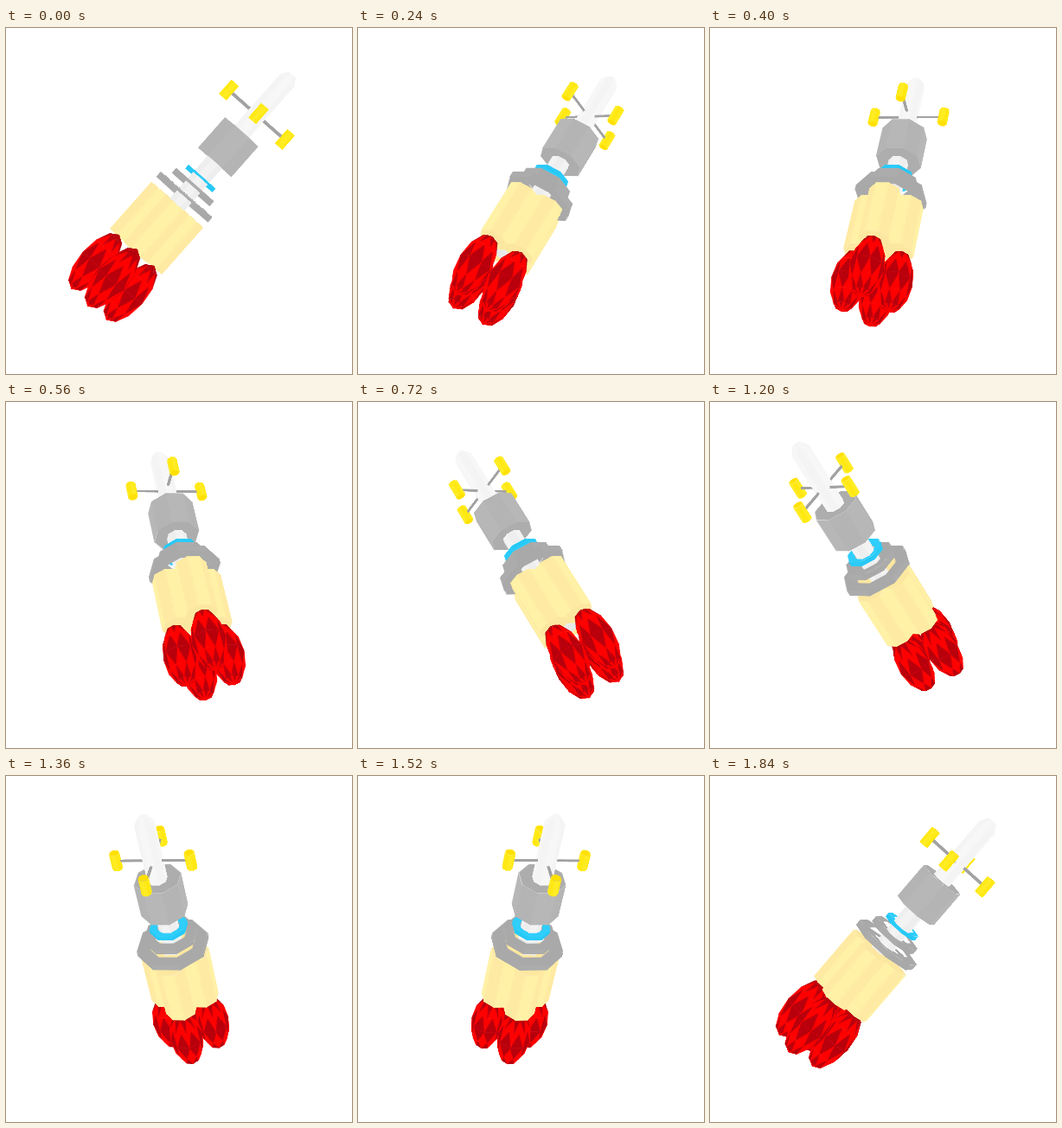
Write an HTML page without scripts that moves like this. It is 400 by 400 pixels and loops after 1920 ms.

```html
<!DOCTYPE html>
<html lang="en">
<head>
<meta charset="utf-8">
<title>Spinning rocket</title>
<style>
@property --a { syntax: "<angle>"; inherits: true; initial-value: 0deg; }
@keyframes turn { to { --a: 360deg; } }

html, body { margin: 0; width: 100%; height: 100%; overflow: hidden; background: #fff; }
.stage { position: absolute; inset: 0; overflow: hidden; isolation: isolate; animation: turn 1920ms steps(24) infinite; }

/* Parts stack along the rocket's axis: k grows towards the flames */
.set, .p { position: absolute; left: 0; top: 0; z-index: calc(200 * var(--k) * sin(var(--a))); }
.p {
  --o: 0deg; --d: 0px;
  width: 0; height: 0;
  transform-style: preserve-3d;
  transform-origin: 0 0;
  transform: translate(201px, 165px) perspective(2000px) translateY(35.6px)
    rotateY(var(--a)) translateZ(7px) rotateZ(41.5deg)
    rotateY(var(--o)) translate3d(0, var(--y), var(--d));
}

/* Four copies around the axis, sorted by depth */
.set .p { z-index: calc(100 * (cos(var(--a)) * cos(var(--o)) - .75 * sin(var(--a)) * sin(var(--o)))); }
.set .p:nth-child(2) { --o: 90deg; }
.set .p:nth-child(3) { --o: 180deg; }
.set .p:nth-child(4) { --o: 270deg; }
.set .core { z-index: 0; }

/* Side face: r and q are the top and bottom radius, t the start, h the height */
i {
  --q: var(--r); --t: 0px;
  --w: calc(var(--r) * .8284 + 1.2px);
  --v: calc(var(--q) * .8284 + 1.2px);
  --m: max(var(--w), var(--v));
  position: absolute; left: 0; top: 0;
  width: var(--m);
  height: calc(hypot(var(--q) - var(--r), var(--h)) + .8px);
  background: var(--c);
  backface-visibility: hidden;
  transform-origin: 0 0;
  transform: rotateY(calc(var(--i) * 45deg)) translate3d(-50%, var(--t), var(--r))
    rotateX(atan2(var(--q) - var(--r), var(--h)));
}
i:nth-child(2n) { background: var(--e); }
i:nth-child(8n+1) { --i: 0; }
i:nth-child(8n+2) { --i: 1; }
i:nth-child(8n+3) { --i: 2; }
i:nth-child(8n+4) { --i: 3; }
i:nth-child(8n+5) { --i: 4; }
i:nth-child(8n+6) { --i: 5; }
i:nth-child(8n+7) { --i: 6; }
i:nth-child(8n) { --i: 7; }
.flame i, .tip i:nth-child(-n+8) {
  --x: calc((var(--m) - var(--w)) / 2);
  --z: calc((var(--m) - var(--v)) / 2);
  clip-path: polygon(var(--x) 0, calc(100% - var(--x)) 0, calc(100% - var(--z)) 100%, var(--z) 100%);
}

/* End caps */
b {
  position: absolute; left: 0; top: 0;
  width: calc(var(--r) * 2); height: calc(var(--r) * 2);
  background: var(--l);
  backface-visibility: hidden;
  transform-origin: 0 0;
  transform: rotateX(90deg) translate(-50%, -50%);
  clip-path: polygon(29.3% 0, 70.7% 0, 100% 29.3%, 100% 70.7%, 70.7% 100%, 29.3% 100%, 0 70.7%, 0 29.3%);
}
b + b, .rod b { transform: translateY(var(--h)) rotateX(-90deg) translate(-50%, -50%); }

.rod { --r: 10.8px; --c: #f3f3f3; --e: #eeeeee; --l: #e8e8e8; }
.tip { --y: -195px; --r: 10.6px; --h: 79px; --c: #f7f7f7; --e: #f4f4f4; --l: #f6f6f6; }
.tip i { --t: 9px; }
.tip i:nth-child(-n+8) { --r: 5px; --q: 10.6px; --h: 9px; --t: 0px; }
.tip b { --r: 5px; }

.set .arm { --y: -144.5px; --d: 43px; --r: 5.3px; --h: 21px; --c: #ffec24; --e: #ffe812; --l: #ffe100; }
/* Strut from the pod back to the hull */
em {
  position: absolute; left: 0; top: 8.5px;
  width: 33px; height: 4px;
  background: #a2a2a2;
  transform-origin: 0 50%;
  transform: rotateY(90deg);
}
em + em { transform: rotateY(90deg) rotateX(90deg); }

.body { --y: -107px; --r: 25.2px; --h: 46px; --c: #b7b7b7; --e: #b4b4b4; --l: #adadad; }

.ring { --h: 7px; --c: #acacac; --e: #a9a9a9; --l: #a9a9a9; }
.ring b {
  backface-visibility: visible;
  clip-path: polygon(evenodd,
    29.3% 0, 70.7% 0, 100% 29.3%, 100% 70.7%, 70.7% 100%, 29.3% 100%, 0 70.7%, 0 29.3%, 29.3% 0,
    36.3% 17%, 63.7% 17%, 83% 36.3%, 83% 63.7%, 63.7% 83%, 36.3% 83%, 17% 63.7%, 17% 36.3%, 36.3% 17%);
}
.blue { --h: 5px; --c: #2bcbf8; --e: #27c8f6; --l: #2fcefb; }

.set .tank { --y: 4.5px; --d: 22px; --r: 17.3px; --h: 71.5px; --c: #fff1a6; --e: #feeaa2; --l: #fce7a0; }

/* Flame: six bands of an ellipsoid, n counts from the top */
.set .flame { --y: 116.5px; --d: 27px; --hot: #f00; --dim: #b8000c; }
.flame i {
  --n: 0;
  --r: calc(18px * sin(var(--n) * 30deg));
  --q: calc(18px * sin((var(--n) + 1) * 30deg));
  --t: calc(-41.5px * cos(var(--n) * 30deg));
  --h: calc(41.5px * (cos(var(--n) * 30deg) - cos((var(--n) + 1) * 30deg)));
}
.flame i:nth-child(n) { background: var(--dim); }
.flame i:nth-child(n+9) { --n: 1; }
.flame i:nth-child(n+17) { --n: 2; background: var(--hot); }
.flame i:nth-child(n+25) { --n: 3; }
.flame i:nth-child(n+33) { --n: 4; }
.flame i:nth-child(n+41) { --n: 5; }
.flame i:nth-child(n+9)::after {
  content: ""; position: absolute; inset: 0;
  background: var(--hot);
  clip-path: polygon(50% 0, 100% 100%, 0 100%);
}
.flame i:nth-child(n+17)::after { background: var(--dim); }
.flame i:nth-child(n+25)::after { clip-path: polygon(0 0, 100% 0, 50% 100%); }
.flame i:nth-child(n+33)::after { clip-path: polygon(50% 0, 80% 100%, 20% 100%); }
.flame i:nth-child(n+41)::after { clip-path: polygon(30% 0, 70% 0, 50% 80%); }
</style>
</head>
<body>
<div class="stage">
  <div class="set" style="--k:0">
    <div class="p arm"><i></i><i></i><i></i><i></i><i></i><i></i><i></i><i></i><b></b><b></b><em></em><em></em></div>
    <div class="p arm"><i></i><i></i><i></i><i></i><i></i><i></i><i></i><i></i><b></b><b></b><em></em><em></em></div>
    <div class="p arm"><i></i><i></i><i></i><i></i><i></i><i></i><i></i><i></i><b></b><b></b><em></em><em></em></div>
    <div class="p arm"><i></i><i></i><i></i><i></i><i></i><i></i><i></i><i></i><b></b><b></b><em></em><em></em></div>
    <div class="p core tip"><i></i><i></i><i></i><i></i><i></i><i></i><i></i><i></i><i></i><i></i><i></i><i></i><i></i><i></i><i></i><i></i><b></b></div>
  </div>
  <div class="p body" style="--k:1"><i></i><i></i><i></i><i></i><i></i><i></i><i></i><i></i><b></b><b></b></div>
  <div class="p rod" style="--k:2;--y:-61px;--h:25px"><i></i><i></i><i></i><i></i><i></i><i></i><i></i><i></i></div>
  <div class="p ring blue" style="--k:3;--y:-38.5px;--r:20.5px"><i></i><i></i><i></i><i></i><i></i><i></i><i></i><i></i><b></b><b></b></div>
  <div class="p rod" style="--k:4;--y:-36px;--h:13px"><i></i><i></i><i></i><i></i><i></i><i></i><i></i><i></i></div>
  <div class="p ring" style="--k:5;--y:-26.5px;--r:28.5px"><i></i><i></i><i></i><i></i><i></i><i></i><i></i><i></i><b></b><b></b></div>
  <div class="p rod" style="--k:6;--y:-23px;--h:15px"><i></i><i></i><i></i><i></i><i></i><i></i><i></i><i></i></div>
  <div class="p ring" style="--k:7;--y:-11.5px;--r:39px"><i></i><i></i><i></i><i></i><i></i><i></i><i></i><i></i><b></b><b></b></div>
  <div class="set" style="--k:8">
    <div class="p tank"><i></i><i></i><i></i><i></i><i></i><i></i><i></i><i></i><b></b><b></b></div>
    <div class="p tank"><i></i><i></i><i></i><i></i><i></i><i></i><i></i><i></i><b></b><b></b></div>
    <div class="p tank"><i></i><i></i><i></i><i></i><i></i><i></i><i></i><i></i><b></b><b></b></div>
    <div class="p tank"><i></i><i></i><i></i><i></i><i></i><i></i><i></i><i></i><b></b><b></b></div>
    <div class="p core rod" style="--y:-8px;--h:88px"><i></i><i></i><i></i><i></i><i></i><i></i><i></i><i></i><b></b></div>
  </div>
  <div class="set" style="--k:9">
    <div class="p flame"><i></i><i></i><i></i><i></i><i></i><i></i><i></i><i></i><i></i><i></i><i></i><i></i><i></i><i></i><i></i><i></i><i></i><i></i><i></i><i></i><i></i><i></i><i></i><i></i><i></i><i></i><i></i><i></i><i></i><i></i><i></i><i></i><i></i><i></i><i></i><i></i><i></i><i></i><i></i><i></i><i></i><i></i><i></i><i></i><i></i><i></i><i></i><i></i></div>
    <div class="p flame"><i></i><i></i><i></i><i></i><i></i><i></i><i></i><i></i><i></i><i></i><i></i><i></i><i></i><i></i><i></i><i></i><i></i><i></i><i></i><i></i><i></i><i></i><i></i><i></i><i></i><i></i><i></i><i></i><i></i><i></i><i></i><i></i><i></i><i></i><i></i><i></i><i></i><i></i><i></i><i></i><i></i><i></i><i></i><i></i><i></i><i></i><i></i><i></i></div>
    <div class="p flame"><i></i><i></i><i></i><i></i><i></i><i></i><i></i><i></i><i></i><i></i><i></i><i></i><i></i><i></i><i></i><i></i><i></i><i></i><i></i><i></i><i></i><i></i><i></i><i></i><i></i><i></i><i></i><i></i><i></i><i></i><i></i><i></i><i></i><i></i><i></i><i></i><i></i><i></i><i></i><i></i><i></i><i></i><i></i><i></i><i></i><i></i><i></i><i></i></div>
    <div class="p flame"><i></i><i></i><i></i><i></i><i></i><i></i><i></i><i></i><i></i><i></i><i></i><i></i><i></i><i></i><i></i><i></i><i></i><i></i><i></i><i></i><i></i><i></i><i></i><i></i><i></i><i></i><i></i><i></i><i></i><i></i><i></i><i></i><i></i><i></i><i></i><i></i><i></i><i></i><i></i><i></i><i></i><i></i><i></i><i></i><i></i><i></i><i></i><i></i></div>
  </div>
</div>
</body>
</html>
```
